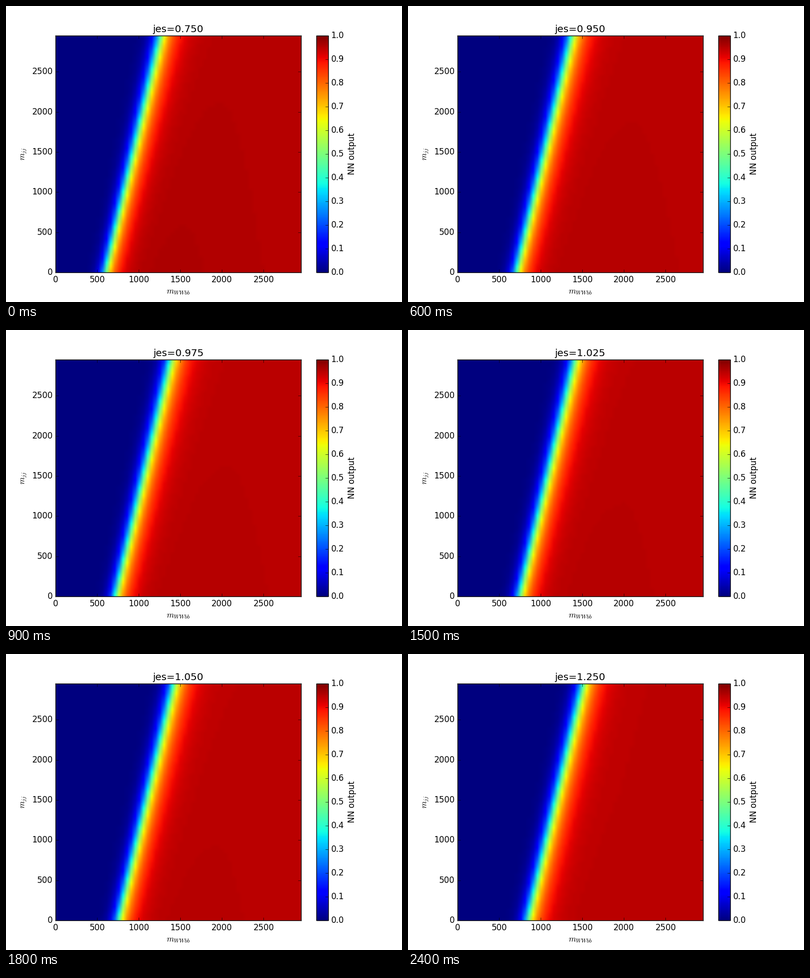
A matplotlib script that plays this animation: 800 px wide and 600 px high, repeating every 2700 ms.

```python
import numpy as np
import matplotlib.pyplot as plt
from matplotlib.animation import FuncAnimation

plt.style.use("classic")

SCALES = [0.75, 0.9, 0.95, 0.975, 1.0, 1.025, 1.05, 1.1, 1.25]
LIMIT = 2950
CELLS = 60
LEVELS = 256

centres = (np.arange(CELLS) + 0.5) * LIMIT / CELLS
X, Y = np.meshgrid(centres, centres)


def plateau(jes):
    """Height right of the edge, in colour levels: a ridge with a slow fall-off."""
    d = jes - 0.75
    low = max(0, (0.9 - jes) / 0.15)
    spacing = 1530 + 2870 * d
    crest_end = 1430 - 9400 * (jes - 1) - 70 * low
    crest = 243 + (crest_end - Y) / spacing
    dx = np.maximum(X - (1308 + 1100 * d + 0.29 * Y), 0)
    fall = (1 + 0.5 * low) * dx**2 / (938 * (dx + 395))
    return np.maximum(crest - fall, 242.15 + low)


def edge(jes):
    """Skewed sigmoid along a slanted front: steep on the left, long tail on the right."""
    d = jes - 0.75
    h = Y / LIMIT
    front = 642 + 672 * h + 590 * d - 180 * d**2
    width = 1 + 0.3 * d * (1 - h) + 0.25 * h
    t = (X - front) / width
    z = 0.72 + 0.01745 * t - 0.00635 * (np.hypot(t, 40) - 40)
    return 1 / (1 + np.exp(-z))


def nn_output(jes):
    return plateau(jes) * edge(jes) / LEVELS


fig, ax = plt.subplots(figsize=(8, 6), dpi=100, facecolor="white")
image = ax.imshow(
    nn_output(SCALES[0]), origin="lower", extent=(0, LIMIT, 0, LIMIT),
    aspect="auto", cmap="jet", vmin=0, vmax=1,
    interpolation="bilinear", interpolation_stage="rgba",
)
ax.set_xticks(range(0, LIMIT, 500))
ax.set_yticks(range(0, LIMIT, 500))
ax.set_xlabel("$m_{WWbb}$")
ax.set_ylabel("$m_{jj}$")
title = ax.set_title("")

bar = fig.colorbar(image, ax=ax, ticks=np.linspace(0, 1, 11))
bar.ax.set_yticklabels([f"{v:.1f}" for v in np.linspace(0, 1, 11)])
bar.set_label("NN output")


def update(i):
    jes = SCALES[i]
    image.set_data(nn_output(jes))
    title.set_text(f"jes={jes:.3f}")
    return image, title


anim = FuncAnimation(fig, update, frames=len(SCALES), interval=300,
                     repeat=True, repeat_delay=0, blit=False)
plt.show()
```
